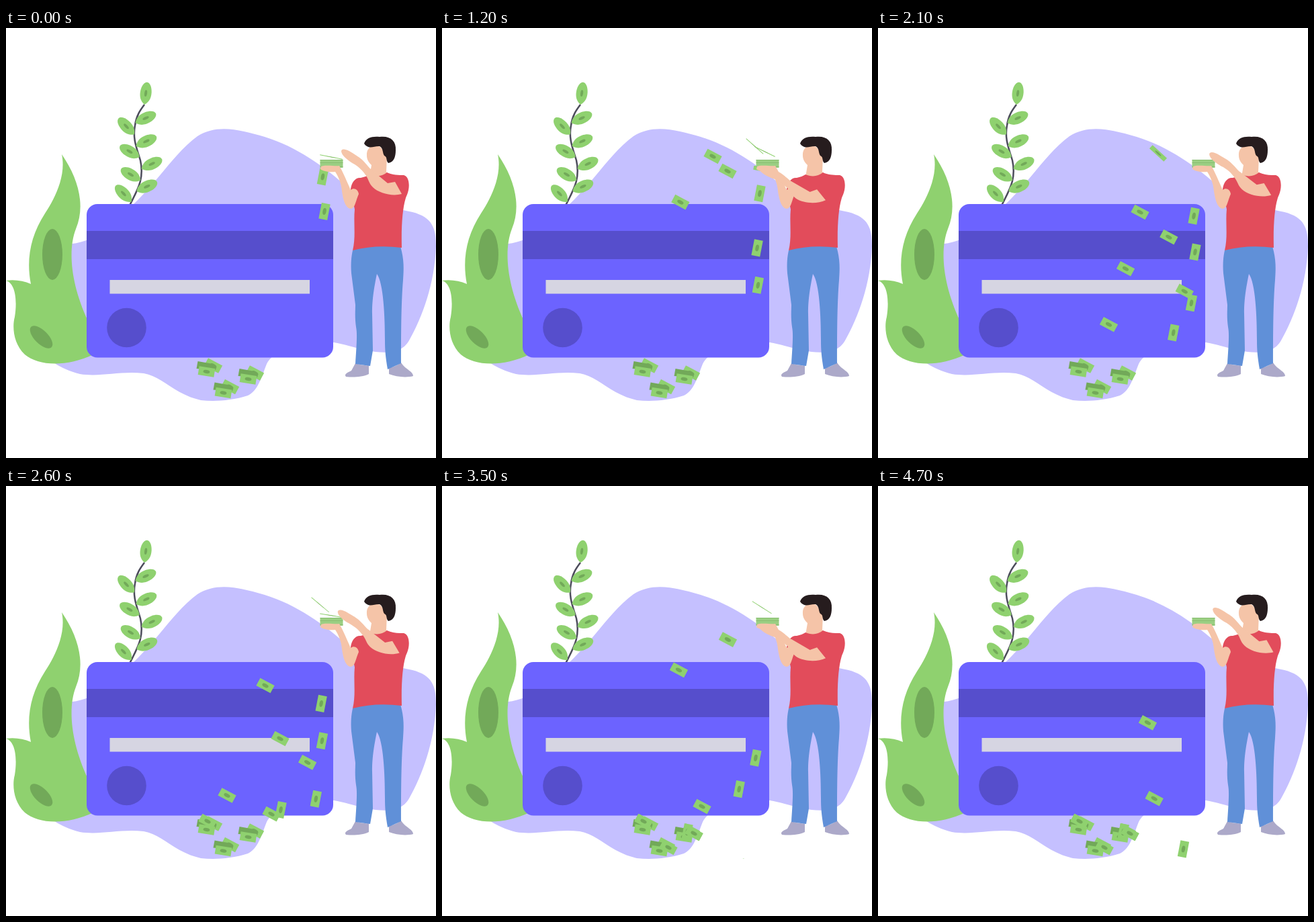
These frames come from a looping animation (640 by 640 pixels, 4800 ms). An HTML page:

```html
<!DOCTYPE html>
<html lang="en">
<head>
<meta charset="utf-8">
<title>Card and falling cash</title>
<style>
  html, body { margin: 0; width: 100%; height: 100%; overflow: hidden; background: #fff; }
  svg { display: block; width: 100%; height: 100%; }
  .leaf { fill: #8fd16f; }
  .vein { fill: #72a959; }
  .skin { fill: #f5c4a8; }
</style>
</head>
<body>
<svg viewBox="0 0 640 640">
  <defs>
    <g id="bill">
      <rect class="leaf" x="-12" y="-6.5" width="24" height="13"/>
      <ellipse class="vein" rx="5" ry="2.6"/>
    </g>
    <g id="sprig">
      <path class="leaf" d="M0 0C5-7 12-9 20-8.3C28-7.5 33.5-4 33.5 0C33.5 4 28 7.5 20 8.3C12 9 5 7 0 0"/>
      <ellipse class="vein" cx="17" rx="5" ry="2"/>
    </g>
    <g id="pile">
      <use href="#bill" transform="translate(308.5 502.5) rotate(28)"/>
      <path class="vein" d="M285.5 496L308 500L313.5 504L312 509L283.5 507Z"/>
      <use href="#bill" transform="translate(298.5 511.5) rotate(9)"/>
    </g>
    <clipPath id="drop"><rect y="205" width="640" height="350"/></clipPath>
  </defs>

  <path fill="#c5c0ff" d="M90 322C130 320 160 295 190 262C226 228 253 184 285 161C315 142 350 152 385 162C437 178 482 212 520 248C545 265 580 268 605 274C635 282 640 298 640 325C638 380 620 430 600 465C590 483 570 484 550 482C520 478 490 464 460 466C420 470 395 485 388 500C380 520 375 540 360 547C335 555 310 556 290 554C250 545 235 520 205 514C170 510 140 520 110 515C90 510 75 502 60 490Z"/>

  <path id="stem" fill="none" stroke="#4d4d5c" stroke-width="2.5" d="M184 264C196 240 206 225 200 197C195 180 188 165 192 145C194 130 200 122 206 114"/>
  <g id="sprigs"></g>
  <path class="leaf" d="M83 188C107 223 119 263 104 299C92 330 96 380 122 436L130 486C90 505 48 503 28 486C11 470 9 445 13 430C17 405 14 380 0 376C12 374 26 376 37 381C30 345 36 310 58 276C72 255 90 220 83 188Z"/>
  <ellipse class="vein" cx="69" cy="337" rx="15" ry="38"/>
  <ellipse class="vein" cx="52.5" cy="460" rx="10" ry="21.5" transform="rotate(-45 52.5 460)"/>

  <rect x="120" y="262" width="367" height="228.5" rx="16" fill="#6c63ff"/>
  <rect x="120" y="302" width="367" height="42" fill="#564ecc"/>
  <rect x="154.5" y="375" width="297.5" height="20.5" fill="#d6d5e2"/>
  <circle cx="179.5" cy="446" r="29.3" fill="#564ecc"/>

  <use href="#pile"/>
  <use href="#pile" x="62" y="11"/>
  <use href="#pile" x="25" y="31.5"/>

  <path fill="#aca9c9" d="M520 499Q530 503 540 502L540 515C530 520 515 520 506 519C502 515 510 512 514 510ZM570 506Q580 504 588 498C594 508 606 511 606 518C595 521 580 519 570 515Z"/>
  <path fill="#6090d8" d="M516 331C535 323 565 324 587 325C593 345 592 360 591 375C588 410 588 460 588 499L568 508C565 490 564 480 564 465C564 430 562 380 552 366C546 395 545 410 545 425L546 480L542 503L520 500C522 470 523 455 521 445C519 430 520 420 520 412L514 365C513 350 514 340 516 331Z"/>
  <path class="skin" d="M537 190C536 178 546 172 557 177L567 190L566 214L573 222L541 222L544 204C539 199 537 195 537 190Z"/>
  <path fill="#261c1e" d="M533 172C536 163 545 161 556 162C572 160 581 168 580 182C580 192 577 200 569 201C565 197 568 192 563 190C560 186 562 179 556 176C548 175 540 182 533 172Z"/>
  <path fill="#e24c5b" d="M541 218C550 222 560 221 567 215C575 219 585 219 592 219C600 221 602 235 597 248C591 260 588 290 589 327Q550 322 516 331C521 310 517 290 519 270L513 240C514 230 520 222 528 223C533 222 538 220 541 218Z"/>

  <g id="falling" clip-path="url(#drop)"></g>
  <rect x="467.5" y="196" width="34" height="12" fill="#9bcf83"/>
  <path stroke="#82b86c" d="M467.5 196.5h34M467.5 200.5h34M467.5 206.5h34" stroke-width=".7"/>
  <path class="skin" d="M469 206C475 203 490 206 496 205C502 215 508 230 513 241C518 237 524 240 525 247C520 258 520 268 513 269C505 268 502 256 500 243C499 230 494 220 490 214C480 215 472 213 468 210Z"/>
  <g id="tossed"></g>
  <path id="arm" class="skin" d="M499 183C500 178 508 181 514 185C522 190 527 193 531 197C537 203 541 209 544 211L568 231L579 229L589 247C575 251 555 246 546 237C540 231 540 226 536 220C530 211 525 207 519 203C510 198 499 190 499 183Z"/>
</svg>
<script>
const $ = id => document.getElementById(id);
const LOOP = 4800, STEP = 100;
const mix = (a, b, f) => a + (b - a) * f;

function addUse(parent, href) {
  const el = document.createElementNS('http://www.w3.org/2000/svg', 'use');
  el.setAttribute('href', href);
  $(parent).append(el);
  return el;
}

function place(el, { x, y, angle, long = 1, thick = 1 }) {
  el.setAttribute('transform',
    `translate(${x} ${y}) rotate(${angle}) scale(${long} ${thick})`);
}

// Leaves alternate along the stem, with one more at its end.
function growSprigs() {
  const stem = $('stem'), end = stem.getTotalLength();
  for (let i = 0; i < 9; i++) {
    const { x, y } = stem.getPointAtLength(i < 8 ? 6 + i * 17.4 : end);
    const angle = i === 8 ? -83 : i % 2 ? -25 : -134 - 18 * Math.sin(Math.PI * i / 6);
    place(addUse('sprigs', '#sprig'), { x, y, angle });
  }
}

// Point at time t on a path of [time, x, y] turning points
function along(path, t) {
  const next = path.findIndex(p => p[0] > t);
  if (next < 0) return { x: path.at(-1)[1], y: path.at(-1)[2] };
  const a = path[Math.max(next - 1, 0)], b = path[Math.max(next, 1)];
  const f = (t - a[0]) / (b[0] - a[0]);
  return { x: mix(a[1], b[1], f), y: mix(a[2], b[2], f) };
}

const FLICK = 650, OPEN = 200;

// A bill lifts off the stack edge-on, then opens and sways down.
function toss(path, t) {
  if (t >= FLICK + OPEN) return { ...along(path, t - FLICK - OPEN), angle: 28 };
  const p = Math.min(t / FLICK, 1), open = Math.max(0, (t - FLICK) / OPEN);
  const [, x, y] = path[0];
  return {
    x: mix(484 - 52 * p ** 2.8, x, open),
    y: mix(194 - 26 * p, y, open),
    angle: mix(7 + 50 * p, 28, open),
    long: mix(1.42, 1, open),
    thick: mix(.07, 1, open)
  };
}

const drop = (path, t) => ({ ...along(path, t), angle: 101 });

const curved = [[-700, 471, 195], [0, 474, 273], [1300, 470, 392],
  [1900, 452, 442], [2600, 409, 482], [3250, 365, 515]];
const straight = [[-300, 472, 195], [2000, 467.5, 398], [3500, 452, 567.5], [3900, 448, 612]];
const swayLeft = [[0, 403, 191], [440, 350, 266], [800, 372, 337],
  [1200, 358, 422], [1600, 300, 499]];
const swayRight = [[0, 425, 213], [400, 427, 291], [930, 458, 398], [1550, 375, 517]];
const swayMiddle = [[0, 402, 205], [400, 386, 297], [800, 408, 376],
  [1300, 387, 477], [1600, 337, 538]];

const bills = [];
function launch(layer, move, path, start, first) {
  bills.push({ el: addUse(layer, '#bill'), move, path, start, first });
}

for (const start of [0, 1440])
  for (const path of [curved, straight]) launch('falling', drop, path, start, path[0][0]);

for (const [path, lag] of [[swayLeft, 0], [swayRight, 400], [swayMiddle, 1000]])
  for (const wave of [-50, 350, 2170]) launch('tossed', toss, path, wave + lag, 0);

function armAngle(t) {
  const p = t % 2400;
  return 10.2 * (p < 1150 ? p / 1150 : Math.max(0, 1 - (p - 1150) / 1180));
}

function draw(now) {
  const t = Math.floor(now % LOOP / STEP) * STEP;
  $('arm').setAttribute('transform', `rotate(${-armAngle(t)} 634 357)`);
  for (const { el, move, path, start, first } of bills) {
    const age = t - start;
    el.setAttribute('visibility', age < first ? 'hidden' : 'visible');
    if (age >= first) place(el, move(path, age));
  }
}

let begin;
function tick(now) {
  begin ??= now;
  draw(now - begin);
  requestAnimationFrame(tick);
}
growSprigs();
draw(0);
requestAnimationFrame(tick);
</script>
</body>
</html>
```
